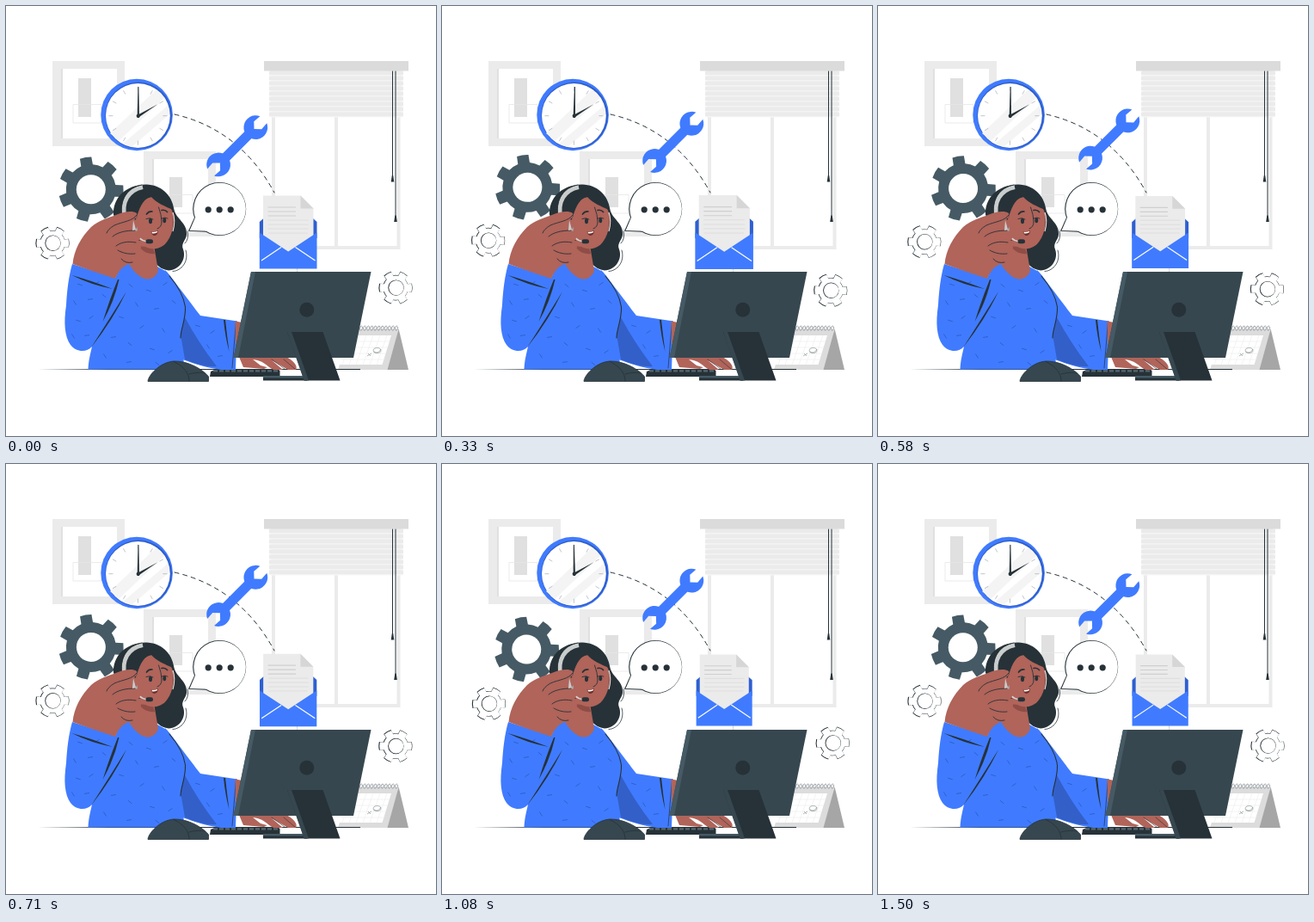
Write an HTML page that moves like this. It is 500 px wide and 500 px high and loops after 1540 ms.

```html
<!DOCTYPE html>
<html lang="en">
<head>
<meta charset="utf-8">
<title>Support desk</title>
<style>
html, body { margin: 0; width: 100%; height: 100%; overflow: hidden; background: #fff; }
svg { display: block; width: 100vw; height: 100vh; }
.ink { fill: none; stroke: #263238; stroke-linecap: round; stroke-linejoin: round; }
.dark { fill: #263238; }
.blue { fill: #407bff; }
.skin { fill: #b0645a; }
.pale { fill: #ebebeb; }
.white { fill: #fff; }
</style>
</head>
<body>
<svg viewBox="0 0 500 500">
  <!-- wall pictures -->
  <g id="picture">
    <path class="pale" fill-rule="evenodd" d="M54 64H138V163H54Z M64 73V154H129V73Z"/>
    <path d="M64 73H66V154H64Z" fill="#e0e0e0"/>
    <path d="M84 84H99V129H84Z" fill="#e0e0e0"/>
    <path d="M78 114.5H111V136H78Z" fill="none" stroke="#e6e6e6" stroke-width=".8"/>
  </g>
  <use href="#picture" x="106" y="105"/>
  <path class="white" d="M189 188H208V199H189Z"/>

  <!-- window -->
  <path class="pale" fill-rule="evenodd" d="M309 76H458.5V283H309Z M313 76V279H382V76Z M386 76V279H454.5V76Z"/>
  <g id="blind"></g>
  <path d="M300 64H468V75.5H300Z" fill="#dbdbdb"/>
  <path class="ink" d="M449.5 76V200M453 76V247" stroke-width="1"/>
  <path class="dark" d="M448.8 197H450.2L451.3 204.5H447.7Z M452.3 243.5H453.7L454.8 251H451.2Z"/>

  <!-- clock -->
  <circle class="blue" cx="152.1" cy="126.5" r="41.8"/>
  <circle cx="154.1" cy="127.3" r="38.8" fill="#2f5ec8"/>
  <circle class="white" cx="153.4" cy="127.5" r="37.4"/>
  <path d="M121 148L175 97L184 107L131 157Z M136 160L188 116L190 126L146 164Z" fill="#f4f4f4"/>
  <g id="ticks" stroke="#a5adb1" stroke-width=".7"></g>
  <path class="dark" d="M153 126.7L176.4 114.2L154.2 129.5Z"/>
  <path class="dark" id="minute" d="M152.6 130L153.4 94L154.4 94L155 130Z"/>
  <circle class="dark" cx="153.7" cy="127.8" r="2.1"/>

  <path class="ink" d="M196 126Q272 143.5 312 217" stroke-width="1" stroke-dasharray="5 5" stroke-linecap="butt"/>

  <g id="wrench">
    <g transform="translate(268.7 162.8) rotate(-45)">
      <path class="blue" d="M-22 -5.7H22V5.7H-22Z"/>
      <path class="blue" id="jaw" d="M43.3 -5.6A13.9 13.9 0 1 0 43.3 5.6L34 6.3L28 0L34 -6.3Z"/>
      <use href="#jaw" transform="rotate(180)"/>
    </g>
  </g>

  <!-- bubble -->
  <g class="dark"><circle cx="248.2" cy="236" r="31"/><path d="M219 246L212 261.8L233 262.8Z"/></g>
  <g class="white"><circle cx="248.6" cy="236" r="30.3"/><path d="M220.4 245L213.6 260.9L236 261.8Z"/></g>
  <g class="dark">
    <circle cx="235.2" cy="236.8" r="3.6"/><circle cx="248.2" cy="236.8" r="3.6"/><circle cx="261.2" cy="236.8" r="3.6"/>
  </g>

  <g id="gears"></g>

  <!-- letter -->
  <path d="M338.5 304V310" stroke="#c8c8c8" stroke-width=".8"/>
  <g id="mail">
    <path d="M294.8 251L300 246.5H356.5L361.5 251V270H294.8Z" fill="#2f5fd0"/>
    <path class="pale" d="M299 220.5H342.5L357.5 235.5V270L328 287L299 270Z"/>
    <path d="M342.5 220.5V235.5H357.5Z" fill="#d6d6d6"/>
    <path d="M304.5 234H337M304.5 239H337M304.5 244H337" stroke="#cfcfcf" stroke-width="1.2"/>
    <path d="M304.5 249H352M304.5 254H352M304.5 259H352M305 264H351" stroke="#dedede" stroke-width="1"/>
    <path class="blue" d="M294.8 263.5L328.2 285.5L361.5 263.5V305.5H294.8Z"/>
    <path d="M297 296L320 280.5M359.5 296L336.5 280.5" stroke="#fff" stroke-width="1.2"/>
  </g>

  <!-- calendar -->
  <path d="M456.5 375L468 423H441Z" fill="#a6a6a6"/>
  <path d="M400 376H456.5L443.5 423H386Z" fill="#dcdcdc"/>
  <path class="white" d="M400 383H448L437.5 417H386Z"/>
  <g id="grid" stroke="#ebebeb" stroke-width=".6"></g>
  <g id="rings" fill="none" stroke="#8d9498" stroke-width=".8"></g>
  <g fill="none" stroke="#7d868a" stroke-width=".6">
    <ellipse cx="431.5" cy="400.5" rx="4.3" ry="3"/>
    <path d="M427.5 402Q433 405 436 399M420 407L425 404M421 404L424 407"/>
  </g>

  <path class="dark" d="M37 422.5L120 422H412V422.9H120Z"/>

  <!-- hair -->
  <path class="dark" d="M125 243C124 224 138 208 163 207.5C180 208 193 219 195.5 237C198 248 211 252 210 266C209 273 203 276 206 283C210 294 202 307 189 307.5C177 306 169 296 167 284L140 262Z"/>
  <path class="ink" d="M209 284C213 297 204 308 194 308.5M211 262Q213 271 208 276" stroke-width=".8"/>

  <!-- body -->
  <path class="blue" d="M185 307C197 321 212 342 226 360L269 366.5L267 423H250C235 421 219 416 205 411L180 350Z"/>
  <path d="M208 362C206 370 203 374 203 382L208 411C222 417 235 420 245 419Q224 392 208 362Z" fill="#335fc9"/>
  <path class="blue" d="M77 300L127 316L134 300L152 297L176 303L187 309C198 322 207 337 208.5 350C209 365 203 376 203 386L207 416V422.5H95.5C96 412 98 405 100 396C93 404 81 402 75 394C68 384 67 368 70 348C71 330 73 314 77 300Z"/>
  <path class="skin" d="M146 270L172 278L177 308C174 316 167 319 161 317C153 314 146 306 142 298Z"/>
  <path d="M154 279C160 287 168 289 173 288L171 281Z" fill="#8f4d46"/>
  <g id="knit" stroke="#2c59bd" stroke-width=".8" stroke-linecap="round"></g>
  <g class="dark">
    <path d="M76.5 313Q98 319 124 329Q98 324 76.5 313Z"/>
    <path d="M131.5 318Q126 343 112.5 367Q121 340 130 318Z"/>
    <path d="M140 332Q125 364 99 397Q121 363 140 332Z"/>
    <path d="M253 365Q255 385 259.5 402Q257 384 255 365Z"/>
  </g>
  <path class="ink" d="M190 314C201 327 207 339 208.5 350C209 365 203 376 203 386" stroke-width="1.1"/>
  <path class="ink" d="M267.5 367L263 421" stroke-width=".7"/>

  <!-- face -->
  <path class="skin" d="M152 241C155 228 163 221 173 222C184 225 192 232 194 241C196 252 194 264 188 273C182 282 173 284 164 281C156 276 151 266 150 256Z"/>
  <path d="M194 240Q197.5 250 194 262" fill="none" stroke="#efd9d4" stroke-width="1.2"/>
  <path class="dark" d="M149 246C149 228 157 216 171 215C183 217 192 226 194 237C185 233 175 229 169 222C162 223 156 230 152 246Z"/>
  <g class="ink">
    <path d="M163.5 242Q166 238.5 170 239M181 237.5Q185 236.5 187.5 239.5" stroke-width="1.7"/>
    <path d="M177.5 234Q181 243 181 251Q181 257 176 259" stroke-width=".9"/>
    <path d="M163 247.5Q167 245.5 171 248M181 247Q185 245 188 247" stroke-width=".9"/>
  </g>
  <ellipse class="dark" cx="168" cy="250" rx="2" ry="3.2"/>
  <ellipse class="dark" cx="184.3" cy="249.3" rx="1.9" ry="3"/>
  <path d="M168.5 262Q173 263 177 261Q177 266 173 267Q169.5 267 168.5 262Z" fill="#702f2c"/>
  <path class="white" d="M169.5 262.6Q173 263.2 176.5 261.8L175.5 263.6Q172 265 169.8 264.2Z"/>

  <!-- headset -->
  <path d="M138 246C134 228 142 214 159 210.5" fill="none" stroke="#c9cdcc" stroke-width="5"/>
  <path class="ink" d="M135 246C131.5 226 140 211 158 208" stroke-width=".9"/>
  <path d="M140 247Q150 246 153 255Q153 267 148 272L138 268Z" fill="#a9aeae"/>
  <path d="M151 262Q153 272 164 274" fill="none" stroke="#d5d8d8" stroke-width="1.3"/>
  <rect class="dark" x="162.5" y="271.2" width="8.5" height="5" rx="2.5"/>

  <!-- raised hand -->
  <path class="skin" d="M77.5 300C79 284 87 269 99 257C108 249 119 246.5 129 242.5C138 239 147 237.5 152 241C154 246 149 249 142 250.5L132 253L149 248C156 249 155 258 149 261L154 262C159 265 157 274 149 275L155 275C159 279 157 287 150 288C154 291 153 298 146 299C138 301 132 305 127 317Q102 309 77.5 300Z"/>
  <path class="ink" d="M152 243C148 250 135 251 126 255C121 258 118 261 117 264M150 261C139 261 130 263 124 268M151 275C141 273 133 275 128 279M150 288C142 289 135 287 130 284M147 298Q139 300 134 294" stroke-width=".9"/>
  <path d="M148 249L151 260L147 261Z" fill="#c9cdcc"/>

  <!-- hand on desk -->
  <path class="skin" d="M266.5 366.5L275 368L270 394L267 395Z M271 408H326C334 412 340 419 337 423H328L309 412L322 423H311L292 412L304 420L300 422L276 420Z"/>
  <path class="white" d="M287 411C296 412 302 416 307 421L296 418Z"/>
  <path class="ink" d="M309 411L324 422M323 411L336 422" stroke-width=".6"/>

  <!-- desk items -->
  <path class="dark" d="M238 425L243 423H317L318.5 424V431H237Z"/>
  <path d="M241 424.3H317" stroke="#55676f" stroke-width="2.2" stroke-dasharray="5 2"/>
  <path d="M165 436.5C165 430 179 413.5 196 413C216 413 232 426 235.5 431V436.5Z" fill="#37474f" stroke="#263238" stroke-width=".8"/>
  <path class="ink" d="M195 413.5C207 419 213 427 213 436M213 428Q224 425 231 427" stroke-width=".8"/>

  <path d="M285 309H424.5L404 409H264.5Z" fill="#37474f"/>
  <path d="M285 309H290L270 409H264.5Z" fill="#455a64"/>
  <circle class="dark" cx="349.8" cy="353.3" r="8.5"/>
  <path class="dark" d="M299 431H350V435.5H299Z"/>
  <path d="M299 430H349V432.5H299Z" fill="#455a64"/>
  <path class="dark" d="M327 379H368.5L388.5 435.5H347Z"/>
  <path d="M327 379H332L352 435.5H346.5Z" fill="#37474f"/>
</svg>
<script>
const $ = id => document.getElementById(id);
const f = v => v.toFixed(2);
const range = (n, fn) => Array.from({ length: n }, (_, i) => fn(i)).join('');
const line = (x1, y1, x2, y2) => `<path d="M${f(x1)} ${f(y1)}L${f(x2)} ${f(y2)}"/>`;

// toothed wheel: R tip radius, r root radius, n teeth, first tooth at angle a
function wheel(R, r, n, a, tip, root) {
  const at = (d, q) => `${f(d * Math.cos(q))} ${f(d * Math.sin(q))}`;
  return range(n, i => {
    const q = a + i * 2 * Math.PI / n;
    return `${i ? `A${r} ${r} 0 0 1 ` : 'M'}${at(r, q - root)}L${at(R, q - tip)}` +
      `A${R} ${R} 0 0 1 ${at(R, q + tip)}L${at(r, q + root)}`;
  }) + `A${r} ${r} 0 0 1 ${at(r, a - root)}Z`;
}

// the outline is heavy on the left and fades on the right
function outlineGear(x, y) {
  const d = wheel(19.6, 14.8, 6, 0, 0.25, 0.31);
  return `<g transform="translate(${x} ${y})">
    <path class="dark" d="${d}"/>
    <path class="white" d="${d}" transform="translate(.3 .05) scale(.96)"/>
    <circle class="dark" cx=".5" r="9.2"/><circle class="white" cx=".8" r="8.6"/></g>`;
}

$('gears').innerHTML =
  `<g transform="translate(98.8 213.2)"><path fill="#455a64" d="${wheel(37.8, 29, 7, -0.84, 0.18, 0.24)}"/>
   <circle class="white" r="17"/></g>` + outlineGear(54, 275.7) + outlineGear(453, 327.6);

$('blind').innerHTML = '<path class="pale" d="M308 75H460V129H308Z"/>' + range(9, i =>
  `<rect x="306" y="${75.6 + i * 6}" width="156" height="4.8" fill="#ebebeb"/>
   <rect x="307" y="${80.4 + i * 6}" width="154" height="1.1" fill="#f8f8f8"/>`);

$('ticks').innerHTML = range(12, i => {
  const c = Math.cos(i * Math.PI / 6), s = Math.sin(i * Math.PI / 6);
  return line(153.4 + 29 * c, 127.7 + 29 * s, 153.4 + 34 * c, 127.7 + 34 * s);
});

$('grid').innerHTML = range(6, i => line(403 + i * 8, 383, 391 + i * 8, 417)) +
  range(4, i => line(396 - i * 2, 390 + i * 7, 446 - i * 2, 390 + i * 7));
$('rings').innerHTML = range(11, i => `<ellipse cx="${413 + i * 4.1}" cy="374.6" rx="1.4" ry="2.6" transform="rotate(12 ${413 + i * 4.1} 374.6)"/>`);

const stitches = [
  [86, 324], [106, 322], [80, 345], [98, 341], [114, 337], [84, 366], [99, 362], [78, 384],
  [94, 383], [145, 325], [166, 331], [185, 323], [152, 347], [175, 352], [195, 344], [134, 362],
  [158, 373], [183, 377], [125, 385], [144, 393], [170, 399], [191, 402], [115, 407], [143, 414],
  [176, 416], [223, 372], [240, 379], [235, 396], [249, 407]
];
$('knit').innerHTML = stitches.map(([x, y], i) => {
  const a = [0.3, -0.6, 1, -0.15, 0.7][i % 5], c = 2.6 * Math.cos(a), s = 2.6 * Math.sin(a);
  return line(x - c, y - s, x + c, y + s);
}).join('');

const LOOP = 1540, CYCLE = 1500;
const swayKeys = [[0, 0], [375, 1], [1125, -1], [CYCLE, 0]];
const liftKeys = [[0, 0], [750, -10], [CYCLE, 0]];
const beatKeys = [[0, 1], [330, 1.013], [580, 0.988], [830, 1], [1080, 0.975], [1330, 0.975], [CYCLE, 0.978]];

function tween(keys, t) {
  const i = Math.max(1, keys.findIndex(k => k[0] >= t));
  const [t0, a] = keys[i - 1], [t1, b] = keys[i];
  return a + (b - a) * (t - t0) / (t1 - t0);
}

// 24 steps per second, starting on whole centiseconds
function stepTime(t) {
  let i = Math.min(36, Math.floor((t + 5) * 0.024));
  if (Math.round(i * 100 / 24) * 10 > t) i--;
  return Math.min(CYCLE, i * 1000 / 24);
}

function draw(ms) {
  const t = stepTime(ms % LOOP);
  const sway = tween(swayKeys, t);
  $('gears').setAttribute('transform', `rotate(${sway} 250 250)`);
  $('minute').setAttribute('transform', `rotate(${sway} 153.7 127.8)`);
  $('wrench').setAttribute('transform', `translate(0 ${tween(liftKeys, t)})`);
  $('mail').setAttribute('transform', `translate(328.2 263) scale(${tween(beatKeys, t)}) translate(-328.2 -263)`);
}

const start = performance.now();
function tick() {
  draw(performance.now() - start);
  requestAnimationFrame(tick);
}
tick();
</script>
</body>
</html>
```
